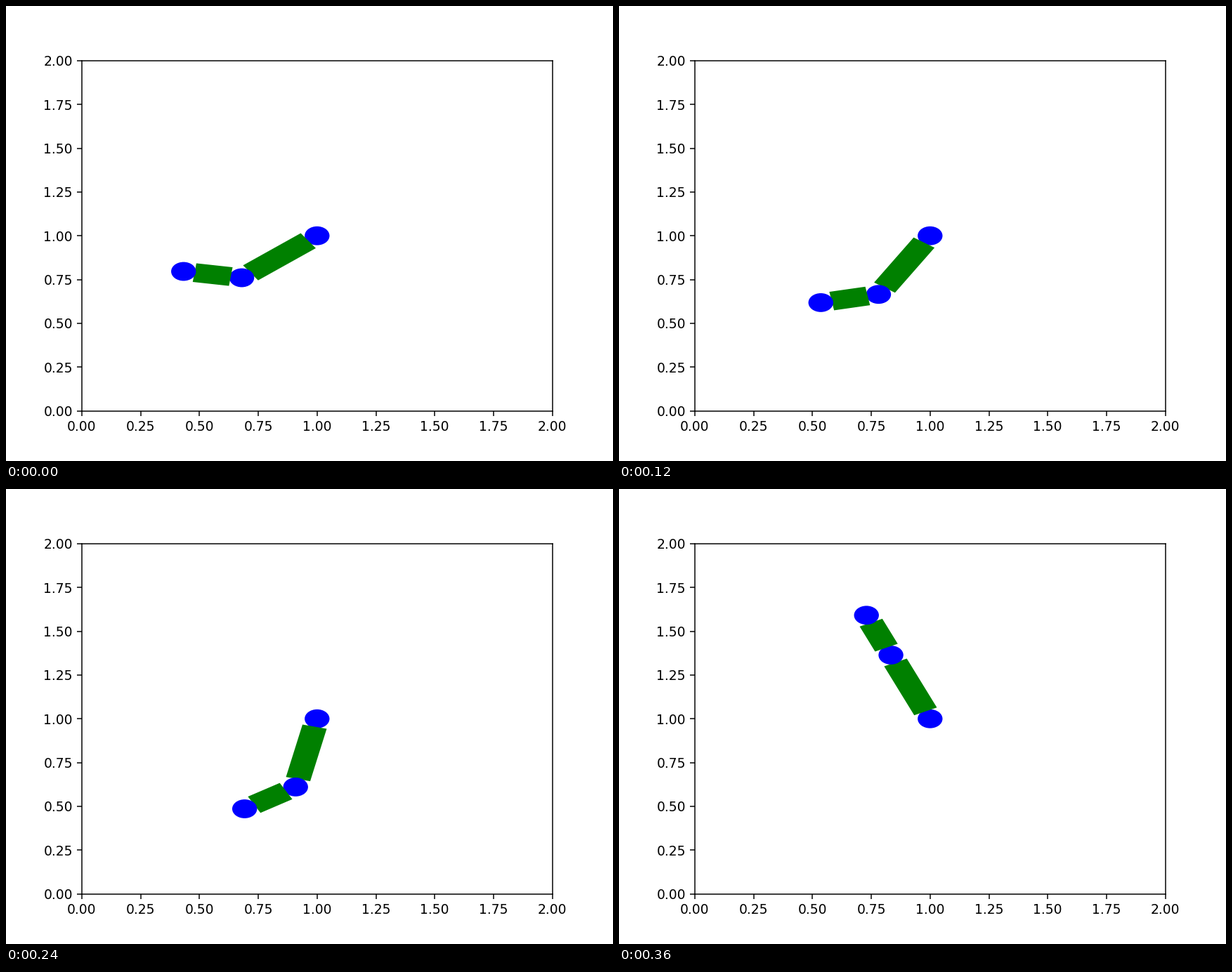
Animation, 864 px wide and 648 px high, one loop 0.39 s. Source, as a matplotlib script:

```python
import math

import matplotlib.pyplot as plt
from matplotlib.animation import FuncAnimation
from matplotlib.patches import Circle, Rectangle

FRAMES = 13
RADIUS = 0.05
LENGTHS = (0.4, 0.25)
BASE = (1.0, 1.0)

fig, ax = plt.subplots(figsize=(6.4, 4.8), dpi=135)
ax.set_xlim(0, 2)
ax.set_ylim(0, 2)


def add_joint():
    return ax.add_patch(Circle(BASE, RADIUS, color="blue"))


def add_link(length):
    return ax.add_patch(Rectangle(BASE, length - 2 * RADIUS, 2 * RADIUS,
                                  rotation_point="center", color="green"))


# Stack the arm from the shoulder outwards.
joints = [add_joint()]
links = []
for length in LENGTHS:
    links.append(add_link(length))
    joints.append(add_joint())


def link_angles(frame):
    """Absolute angle of each link, in degrees."""
    if frame == FRAMES - 1:
        rest = math.degrees(2)
        return rest, rest
    return 216.8 + 5.0 * frame, 171.7 + 4.775 * frame


def update(frame):
    x, y = BASE
    for link, joint, length, angle in zip(links, joints[1:], LENGTHS,
                                          link_angles(frame)):
        dx = length * math.cos(math.radians(angle))
        dy = length * math.sin(math.radians(angle))
        link.set_xy((x + dx / 2 - link.get_width() / 2,
                     y + dy / 2 - link.get_height() / 2))
        link.set_angle(angle)
        x, y = x + dx, y + dy
        joint.set_center((x, y))
    return links + joints


anim = FuncAnimation(fig, update, frames=FRAMES, interval=30,
                     repeat=True, repeat_delay=0)
plt.show()
```
